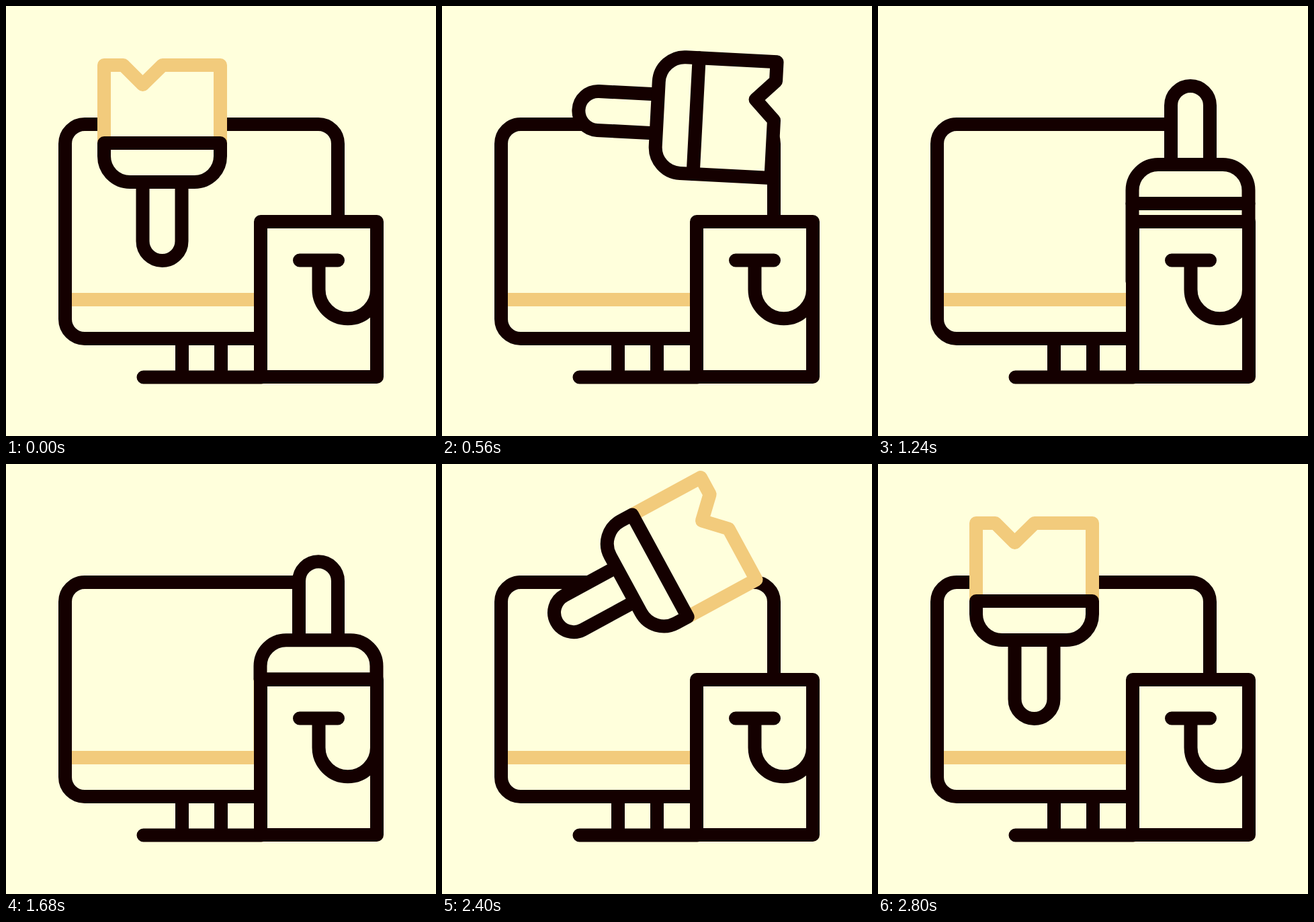
Recreate the animation shown at these times as an HTML page. Size 640 px wide and 640 px high, loop 3 s.

```html
<!DOCTYPE html>
<html lang="en">
<head>
<meta charset="utf-8">
<title>Brush and bucket</title>
<style>
  html, body { margin: 0; width: 100%; height: 100%; overflow: hidden; background: #ffffdc; }
  svg { display: block; width: 100vw; height: 100vh; }
  .ink { fill: #ffffdc; stroke: #140000; stroke-width: 20; stroke-linecap: round; stroke-linejoin: round; }
  .line { fill: none; }
</style>
</head>
<body>
<svg viewBox="0 0 640 640">
  <g class="ink">
    <path d="M262 495V552M320 495V552M204.500 552.500H380"/>
    <rect x="88" y="176" width="406" height="319" rx="29"/>
  </g>
  <path d="M98 437H379" stroke="#f2cb7c" stroke-width="20"/>

  <path id="track" d="M232.500 233.500C260.600 135.500 393 138 465 233.500" fill="none"/>
  <g id="brush" class="ink">
    <path id="bristles" d="M-86.500-29.500V-145.500H-58L-29-116.500L.5-145.500H86.500V-29.500"/>
    <path d="M-29 28.500V116.500a29 29 0 0 0 58 0V28.500"/>
    <path d="M-86.500-29.500H86.500V-10a38.500 38.500 0 0 1-38.500 38.500H-48A38.500 38.500 0 0 1-86.500-10Z"/>
  </g>

  <g class="ink">
    <rect x="379" y="321" width="173" height="231"/>
    <path class="line" d="M437 378.500H494M465.500 378.500V422a43.250 43.250 0 0 0 86.500 0"/>
  </g>
</svg>
<script>
const LOOP = 3000, STEP = 40, DIP = 62;
const INK = [20, 0, 0], PAINT = [242, 203, 124];

const brush = document.getElementById('brush');
const bristles = document.getElementById('bristles');
const track = document.getElementById('track');
const length = track.getTotalLength();

const clamp = v => Math.min(1, Math.max(0, v));
const span = (t, from, to) => clamp((t - from) / (to - from));

// cubic-bezier(a, 0, b, 1)
function ease(x, a, b) {
  let lo = 0, hi = 1;
  for (let i = 0; i < 24; i++) {
    const u = (lo + hi) / 2, v = 1 - u;
    if (3 * u * v * v * a + 3 * u * u * v * b + u * u * u < x) lo = u;
    else hi = u;
  }
  return x <= 0 ? 0 : x >= 1 ? 1 : lo * lo * (3 - 2 * lo);
}

function draw(t) {
  const travel = ease(span(t, 84, 924), 0.68, 0.48) - ease(span(t, 2000, 2785), 0.63, 0.25);
  const dip = ease(span(t, 930, 1550), 0.5, 0.5) - ease(span(t, 1570, 2080), 0.5, 0.5);
  const paint = 1 - span(t, 80, 340) + span(t, 1360, 1600);

  const p = track.getPointAtLength(travel * length);
  brush.setAttribute('transform',
    `translate(${p.x} ${p.y + dip * DIP}) rotate(${travel * 180})`);
  const rgb = INK.map((c, i) => Math.round(c + (PAINT[i] - c) * paint));
  bristles.style.stroke = `rgb(${rgb})`;
}

const start = performance.now();
function tick() {
  const t = (performance.now() - start) % LOOP;
  draw(Math.floor(t / STEP) * STEP);
  requestAnimationFrame(tick);
}
tick();
</script>
</body>
</html>
```
